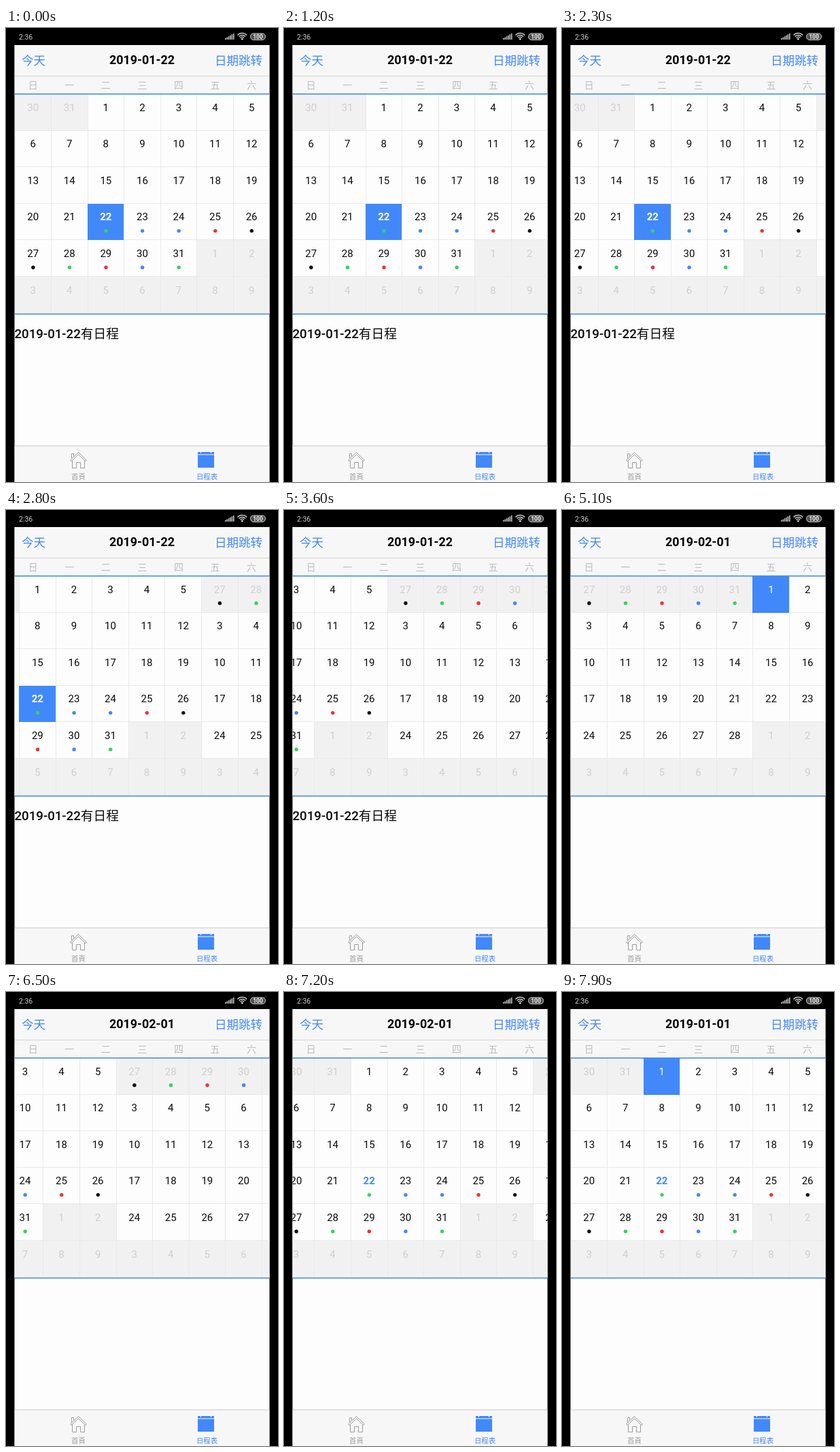
Write an HTML page with a canvas that moves like this. It is 400x666 px and loops after 8 s.

```html
<!DOCTYPE html>
<html lang="zh">
<head>
<meta charset="utf-8">
<style>
html, body { margin: 0; width: 100%; height: 100%; overflow: hidden; background: #000; }
canvas { display: block; width: 400px; height: 666px; }
</style>
</head>
<body>
<canvas id="stage"></canvas>
<script>
const LOOP = 8000, STEP = 100;
const LEFT = 12.5, WIDTH = 375, TOP = 97, CELL = WIDTH / 7, ROW = 53.6;
const BLUE = '#4188fa', EDGE = '#4a90e2', PAPER = '#fdfdfd', BAR = '#f7f7f7', DIM = '#f1f1f1';
const LINE = '#e9e9ec', GREY = '#bdbdbf', STATUS = '#cfcfcf';
const FONT = 'Roboto, "Noto Sans CJK SC", "Noto Sans CJK", sans-serif';
const GREEN = '#34d45c', RED = '#ee3038', BLACK = '#101014';
// Event dots for January 22 to 31
const DOTS = [GREEN, BLUE, BLUE, RED, BLACK, BLACK, GREEN, RED, BLUE, GREEN];
// Time and scroll position of the two swipes
const PATH = [[2100, 0], [2800, 100.5], [3600, 236], [4600, WIDTH],
              [5500, WIDTH], [6500, 226], [7400, 0]];

const canvas = document.getElementById('stage');
const ctx = canvas.getContext('2d');
const ratio = window.devicePixelRatio || 1;
canvas.width = 400 * ratio;
canvas.height = 666 * ratio;

function rect(x, y, w, h, color) {
  ctx.fillStyle = color;
  ctx.fillRect(x, y, w, h);
}

function dot(x, y, r, color) {
  ctx.fillStyle = color;
  ctx.beginPath();
  ctx.arc(x, y, r, 0, Math.PI * 2);
  ctx.fill();
}

function text(str, x, y, size, color, weight = 400, align = 'center') {
  ctx.font = `${weight} ${size}px ${FONT}`;
  ctx.textAlign = align;
  ctx.fillStyle = color;
  ctx.fillText(str, x, y);
}

function stroke(color, width, draw) {
  ctx.strokeStyle = color;
  ctx.lineWidth = width;
  ctx.beginPath();
  draw();
  ctx.stroke();
}

function polyline(...pts) {
  pts.forEach(([x, y], i) => i ? ctx.lineTo(x, y) : ctx.moveTo(x, y));
}

function slope(i) {
  const a = PATH[i - 1], b = PATH[i], c = PATH[i + 1];
  if (!a || !c || (b[1] - a[1]) * (c[1] - b[1]) <= 0) return 0;
  return (c[1] - a[1]) / (c[0] - a[0]);
}

function scrollAt(t) {
  if (t <= PATH[0][0]) return 0;
  for (let i = 0; i < PATH.length - 1; i++) {
    const [t0, p0] = PATH[i], [t1, p1] = PATH[i + 1];
    if (t > t1) continue;
    const d = t1 - t0, u = (t - t0) / d, v = 1 - u;
    return v * v * (1 + 2 * u) * p0 + u * u * (3 - 2 * u) * p1
      + d * u * v * (v * slope(i) - u * slope(i + 1));
  }
  return 0;
}

function dateAt(t) {
  return t < 4700 ? '2019-01-22' : t < 7400 ? '2019-02-01' : '2019-01-01';
}

function iso(date) {
  const two = n => String(n).padStart(2, '0');
  return `${date.getFullYear()}-${two(date.getMonth() + 1)}-${two(date.getDate())}`;
}

function drawMonth(month, left, chosen) {
  const lead = new Date(2019, month, 1).getDay();
  for (let i = 0; i < 42; i++) {
    const date = new Date(2019, month, 1 - lead + i);
    const key = iso(date), day = date.getDate();
    const inside = date.getMonth() === month;
    const picked = inside && key === chosen;
    const today = key === '2019-01-22';
    const row = Math.floor(i / 7), top = TOP + row * ROW;
    const x = Math.round(left + i % 7 * CELL);
    const x2 = Math.round(left + (i % 7 + 1) * CELL);
    const y = Math.round(top), y2 = Math.round(top + ROW);
    rect(x, y, x2 - x, y2 - y, picked ? BLUE : inside ? PAPER : DIM);
    if (!picked) {
      rect(x, y, 1, y2 - y, LINE);
      rect(x, y2 - 1, x2 - x, 1, LINE);
    }
    const cx = left + (i % 7 + .5) * CELL + .4;
    const color = picked ? '#fff' : !inside ? '#cfcfd1' : today ? BLUE : '#0a0a0c';
    text(day, cx, top + 24.5, 15, color, today ? 700 : 400);
    if (date.getMonth() === 0 && day >= 22) {
      dot(cx + .2, top + 39.8, 2.7, DOTS[day - 22]);
    }
  }
}

function drawStatus() {
  text('2:36', 19, 16.5, 10.5, STATUS, 400, 'left');
  for (let i = 0; i < 6; i++) {
    const h = 2 + i * 1.4;
    rect(322 + i * 2.4, 17 - h, 1.5, h, STATUS);
  }
  for (const r of [3.8, 6.6, 9.4]) {
    stroke(STATUS, 1.5, () => ctx.arc(347.3, 17, r, -Math.PI * .76, -Math.PI * .24));
  }
  dot(347.3, 16.2, 1.4, STATUS);
  ctx.beginPath();
  ctx.roundRect(359.5, 8, 22, 9.5, 4.5);
  ctx.fillStyle = '#505050';
  ctx.fill();
  stroke(STATUS, 1, () => ctx.roundRect(359.5, 8, 22, 9.5, 4.5));
  text('100', 370.5, 16, 8.5, '#f4f4f4', 700);
}

function drawHeader(title) {
  rect(LEFT, 25, WIDTH, 72, BAR);
  rect(LEFT, 70, WIDTH, 1, '#d4d4d6');
  text('今天', 23, 53.5, 17.5, BLUE, 400, 'left');
  text('日期跳转', 377, 53.5, 17.5, BLUE, 400, 'right');
  text(title, 200, 53.3, 17.9, '#000', 700);
  [...'日一二三四五六'].forEach((c, i) =>
    text(c, LEFT + (i + .5) * CELL + .4, 89, 14, GREY));
}

function drawTabs() {
  rect(LEFT, 613, WIDTH, 53, BAR);
  rect(LEFT, 612.5, WIDTH, 1, '#c6c6c8');
  const grey = '#9c9c9e';
  ctx.lineJoin = 'round';
  stroke(grey, 1, () => {
    polyline([94.5, 634], [106.5, 622.5], [118.5, 634], [116.8, 635.5],
      [106.5, 625.7], [96.2, 635.5], [94.5, 634]);
    polyline([97.5, 634.5], [97.5, 645.5], [103.5, 645.5], [103.5, 637.5],
      [109.5, 637.5], [109.5, 645.5], [115.5, 645.5], [115.5, 634.5]);
    polyline([96.5, 631.5], [96.5, 624.5], [99.5, 624.5], [99.5, 628.5]);
  });
  text('首頁', 106.5, 661.5, 10.4, grey);
  rect(282, 622, 24, 3.4, BLUE);
  rect(282, 626.4, 24, 18.6, BLUE);
  for (const x of [286, 301]) rect(x, 622, 1, 2, BAR);
  text('日程表', 295.5, 661.5, 10.4, BLUE);
}

function draw(t) {
  const chosen = dateAt(t), shift = scrollAt(t);
  ctx.setTransform(ratio, 0, 0, ratio, 0, 0);
  rect(0, 0, 400, 666, '#000');
  drawStatus();
  ctx.save();
  ctx.beginPath();
  ctx.rect(LEFT, 25, WIDTH, 641);
  ctx.clip();
  rect(0, 25, 400, 641, PAPER);
  drawHeader(chosen);
  drawMonth(0, LEFT - shift, chosen);
  drawMonth(1, LEFT + WIDTH - shift, chosen);
  rect(LEFT, 96, WIDTH, 1.6, EDGE);
  rect(LEFT, 418.8, WIDTH, 1.6, EDGE);
  if (chosen === '2019-01-22') {
    text(chosen + '有日程', 12.5, 454.5, 18.7, '#08080a', 500, 'left');
  }
  drawTabs();
  ctx.restore();
}

const start = performance.now();
function frame() {
  const t = (performance.now() - start) % LOOP;
  draw(Math.floor(t / STEP) * STEP);
  requestAnimationFrame(frame);
}
frame();
</script>
</body>
</html>
```
